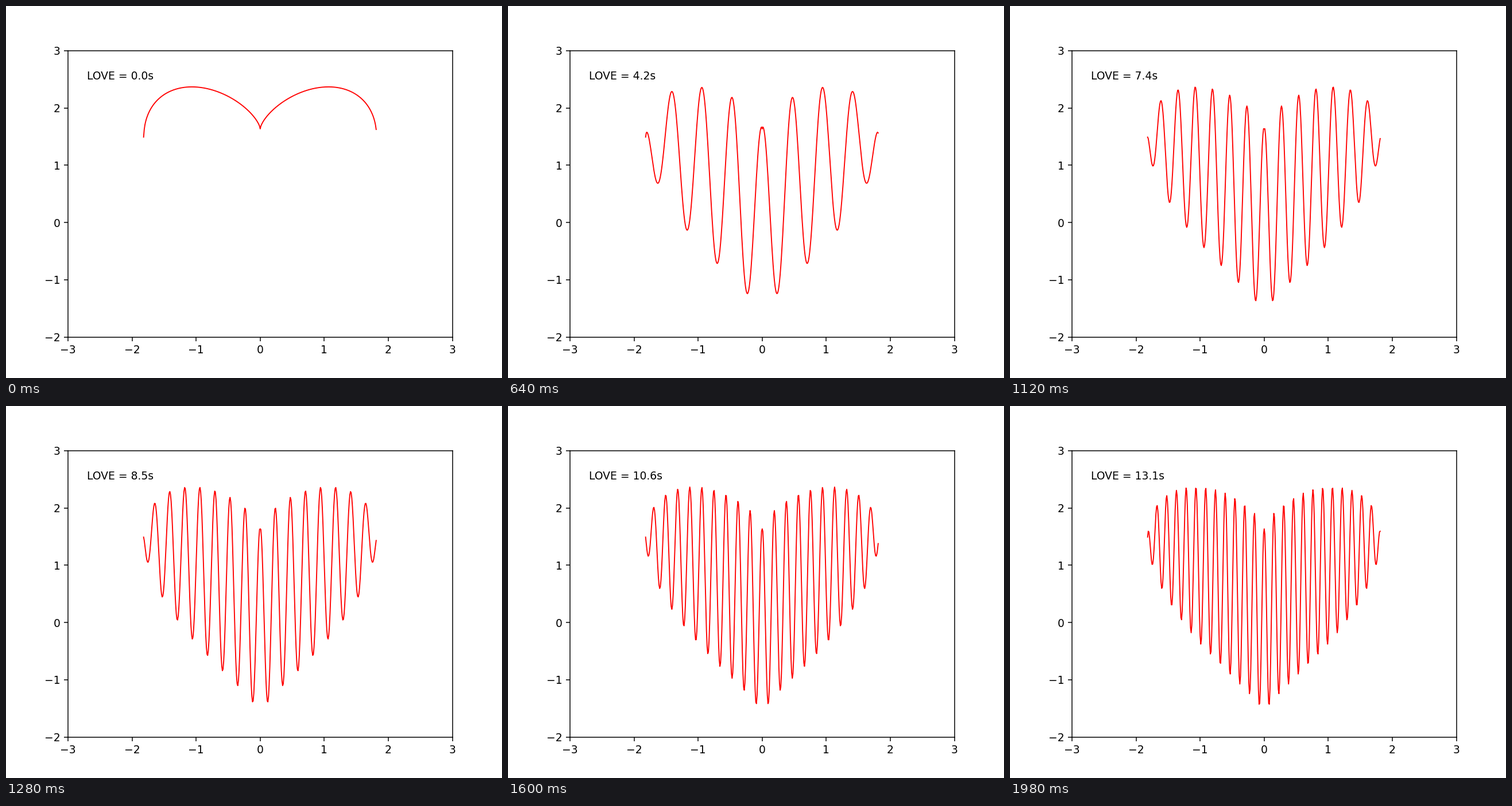
A matplotlib script for the animation above (2000 ms loop, 864 by 648 pixels).

```python
import numpy as np
import matplotlib.pyplot as plt
from matplotlib.animation import FuncAnimation

FRAMES = 100
INTERVAL = 20
MAX_FREQ = 13.14

x = np.arange(-182, 182) / 100
base = np.abs(x) ** (2 / 3)
envelope = 0.9 * np.sqrt(np.clip(3.3 - x**2, 0, None))
freqs = np.linspace(0, MAX_FREQ, FRAMES)

fig, ax = plt.subplots(figsize=(6.4, 4.8), dpi=135)
ax.set_xlim(-3, 3)
ax.set_ylim(-2, 3)
line, = ax.plot([], [], color="red", lw=1)
label = ax.text(0.05, 0.9, "", transform=ax.transAxes)


def update(i):
    a = freqs[i]
    line.set_data(x, base + envelope * np.cos(a * np.pi * x))
    label.set_text(f"LOVE = {a:.1f}s")
    return line, label


anim = FuncAnimation(fig, update, frames=FRAMES, interval=INTERVAL,
                     repeat=True, repeat_delay=0, blit=False)
plt.show()
```
